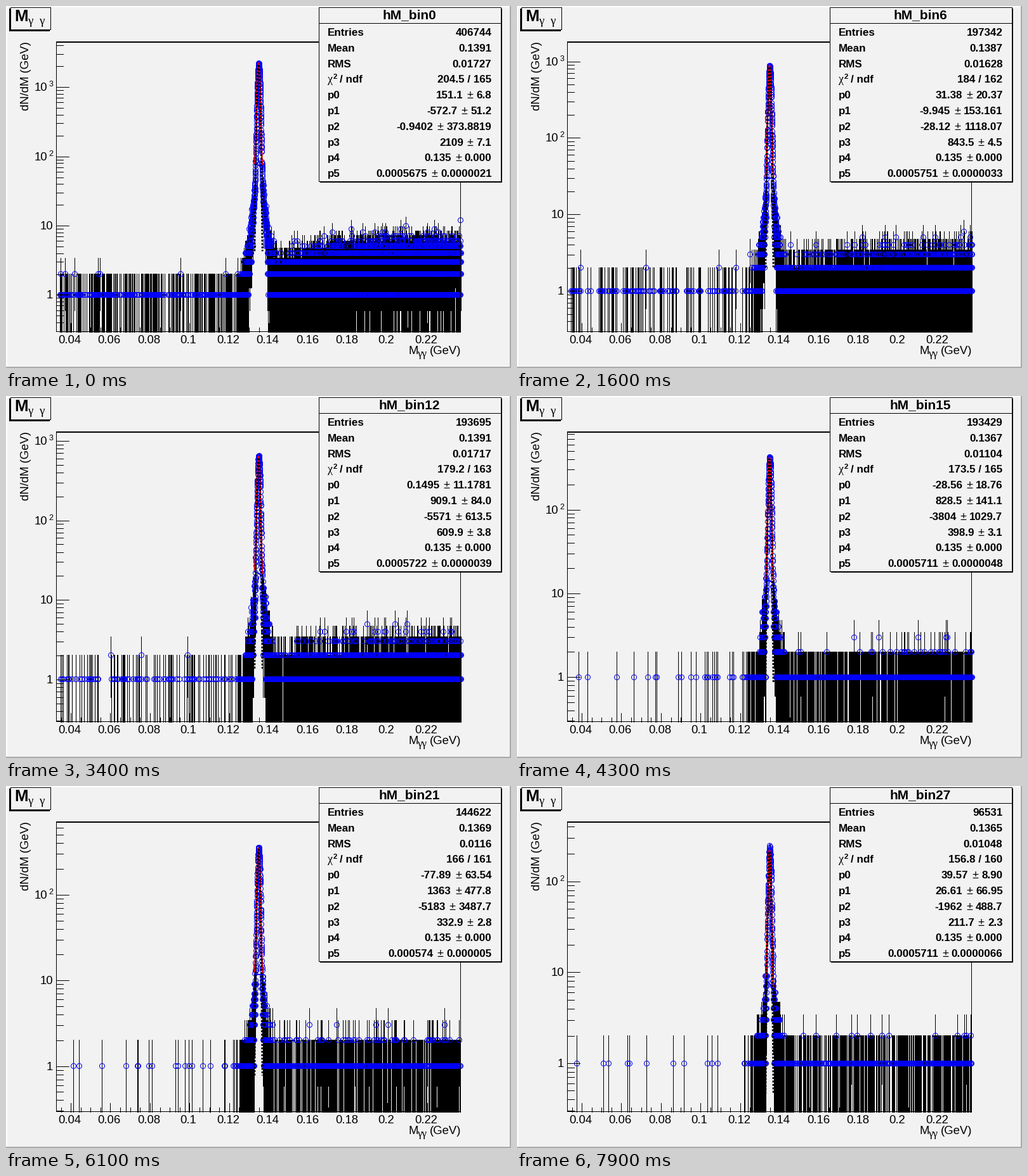
These frames come from a looping animation (796x572 px, 8000 ms). A matplotlib script:

```python
import numpy as np
import matplotlib.pyplot as plt
from matplotlib.animation import FuncAnimation
from matplotlib.collections import LineCollection
from matplotlib.patches import Rectangle

W, H, DPI = 796, 572, 100
PT = 72 / DPI
LEFT, RIGHT, TOP, BOTTOM = 79.5, 716.5, 57, 514.5
PX_PER_GEV, PEAK_X, MASS = 3120, 398, .135
LOG_MIN = -0.535
SANS, SERIF = "Liberation Sans", "Liberation Serif"
PAPER = "#f2f2f2"

# Key points over the bins; all other quantities follow from these
KEY_BINS = [0, 6, 12, 17, 21, 24, 27]
TRACKS = {
    "entries": [406744, 197342, 193695, 193252, 144622, 140587, 96531],
    "rms": [.01727, .01628, .01717, .006953, .0116, .01643, .01048],
    "height": [2109, 843.5, 609.9, 258.2, 332.9, 622.9, 211.7],
    "slope": [-572.7, -9.945, 909.1, 774.8, 1363, 465.2, 26.61],
    "curvature": [-.9402, -28.12, -5571, -2626, -5183, -608.7, -1962],
}


def gev_to_px(m):
    return PEAK_X + (m - MASS) * PX_PER_GEV


def fit_for(b):
    """Values and errors of p0..p5, with the summary rows above them."""
    rng = np.random.default_rng(b)
    entries, rms, height, slope, curvature = (
        np.interp(b, KEY_BINS, track) for track in TRACKS.values())
    ndf = rng.integers(160, 166)
    chi2 = ndf * (.98 + .26 * np.log10(height / 212))
    p0 = .035 * height - slope * MASS - curvature * MASS ** 2
    sigma = .000568 + rng.normal(0, 4e-6)
    values = [p0, slope, curvature, height, MASS, sigma]
    slope_error = 10 ** rng.uniform(1.65, 3.1)
    root = np.sqrt(height)
    errors = [.133 * slope_error, slope_error, 7.3 * slope_error,
              .155 * root, 1e-5, 96e-6 / root]
    summary = [f"{entries:.0f}", f"{MASS + 13.9 * rms ** 2:.4g}", f"{rms:.4g}",
               f"{chi2:.4g} / {ndf}"]
    return summary, values, errors, rms


def counts_for(b, height, sigma, rms):
    """Poisson counts: a peak with tails, a low left side and a rising right side."""
    rng = np.random.default_rng(100 + b)
    x = np.linspace(84, 716.4, 8420)
    d = np.abs(x - PEAK_X)
    far = 4.8 * height * rms ** 2
    near = .25 * far + .04
    rise = 1 - np.exp(-np.clip(x - 425, 0, None) / 110)
    mean = np.where(x < PEAK_X, .025 * far, near + (far - near) * rise)
    mean += .95 * height * np.exp(-.5 * (d / (sigma * PX_PER_GEV)) ** 2)
    mean += .065 * height * np.exp(-d / 4.2) + .7 * np.exp(-d / 11)
    n = rng.poisson(mean)
    points = np.unique(np.column_stack([np.floor(x), n])[n > 0], axis=0)
    return points[:, 0] + .5, points[:, 1]


fig = plt.figure(figsize=(W / DPI, H / DPI), dpi=DPI, facecolor=PAPER)
ax = fig.add_axes([0, 0, 1, 1])
ax.set(xlim=(0, W), ylim=(H, 0))
ax.axis("off")


def fill(x0, y0, x1, y1, color="black", z=5):
    ax.add_patch(Rectangle((x0, y0), x1 - x0, y1 - y0, fc=color, ec="none",
                           aa=False, zorder=z))


def panel(x0, y0, x1, y1):
    fill(x0, y0, x1, y1, z=7)
    fill(x0 + 1, y0 + 1, x1 - 1, y1 - 1, PAPER, 7.5)


def label(x, y, s="", size=18.5, ha="left", bold=False, font=SANS):
    return ax.text(x, y, s, fontsize=size * PT, ha=ha, va="baseline", family=font,
                   weight="bold" if bold else "normal", zorder=8)


def segments(z):
    lines = LineCollection([], colors="black", linewidths=PT, antialiaseds=False, zorder=z)
    return ax.add_collection(lines, autolim=False)


def curve(color, width, style="-"):
    return ax.plot([], [], color=color, lw=width * PT, ls=style, zorder=4,
                   dash_capstyle="butt")[0]


# Bevelled canvas edge
fill(0, 0, W, 2, "white")
fill(0, 0, 2, H, "white")
fill(W - 2, 0, W, H, "#aaaaaa")
fill(0, H - 2, W, H, "#aaaaaa")

# Plot frame and x axis
fill(79, 56, 717, 58)
fill(79, 514, 717, 515)
fill(79, 56, 80, 515)
fill(716, 56, 717, 515)
x_ticks = []
for k in range(7, 48):
    px = np.floor(gev_to_px(k * .005)) + .5
    if LEFT < px < RIGHT:
        major = k % 4 == 0
        x_ticks.append([(px, BOTTOM), (px, BOTTOM - (14 if major else 7))])
        if major:
            label(px - 1, 533, f"{k * .005:.2g}", ha="center")
segments(5).set_segments(x_ticks)

label(634, 550, "M")
label(648, 554, "γγ", 17, font=SERIF)
label(717, 550, "(GeV)", ha="right")
ax.text(40, 56, "dN/dM (GeV)", fontsize=18.5 * PT, family=SANS, rotation=90,
        ha="right", va="top", zorder=8)

# Title box
fill(5, 4, 69, 40, z=6)
panel(7, 2, 71, 38)
label(13, 24, "M", 26, bold=True)
label(35, 29, "γ", 19, font=SERIF)
label(53, 29, "γ", 19, font=SERIF)

# Statistics box
fill(495, 4, 782, 279, z=6)
panel(493, 2, 781, 278)
fill(493, 27, 781, 28, z=8)
header = label(636, 20.5, size=20.9, ha="center", bold=True)
ROWS = [47 + 24.8 * k for k in range(10)]
names = ["Entries", "Mean", "RMS", ""] + [f"p{k}" for k in range(6)]
for name, y in zip(names, ROWS):
    label(507, y, name, 17, bold=True)
label(507, ROWS[3], "χ", 18, font=SERIF)
label(516, ROWS[3] - 6, "2", 11.5, bold=True)
label(526, ROWS[3], "/ ndf", 17, bold=True)
right_texts = [label(765.5, y, size=17, ha="right", bold=True) for y in ROWS]
left_texts = [label(0, y, size=17, ha="right", bold=True) for y in ROWS[4:]]
signs = [label(0, y, "±", 18, ha="center") for y in ROWS[4:]]

# Parts that change with the bin
bars = segments(2)
y_ticks = segments(5)
markers, = ax.plot([], [], "o", ms=8 * PT, mfc="none", mec="blue", mew=PT,
                   aa=False, zorder=3)
total_fit = curve("red", 2.5)
background_fit = curve("blue", 2)
signal_fit = curve("black", 3, (0, (1, .8)))
decade_labels = [(label(0, 0, ha="right"), label(74, 0, size=12.5, ha="right"))
                 for _ in range(4)]


def text_width(s, size=17):
    return size * sum({".": .278, "-": .333}.get(c, .556) for c in s)


def draw_stats(b, summary, values, errors):
    header.set_text(f"hM_bin{b}")
    for text, s in zip(right_texts, summary):
        text.set_text(s)
    for k, (value, error) in enumerate(zip(values, errors)):
        shown = f"{value:.4g}"
        digits = max(1, len(shown.partition(".")[2]))
        error_text = f"{error:.{digits}f}"
        start = 765.5 - text_width(error_text)
        right_texts[4 + k].set_text(error_text)
        signs[k].set_x(start - 10)
        left_texts[k].set_x(start - 21)
        left_texts[k].set_text(shown)


def draw_y_axis(to_y):
    ticks = []
    for power in range(-1, 4):
        for m in range(1, 10):
            y = np.floor(to_y(m * 10.0 ** power)) + .5
            if TOP < y < BOTTOM:
                ticks.append([(LEFT, y), (LEFT + (19.5 if m == 1 else 10), y)])
    y_ticks.set_segments(ticks)
    for power, (base, exponent) in enumerate(decade_labels):
        y = to_y(10.0 ** power)
        visible = y > TOP
        base.set_text(("1" if power == 0 else "10") if visible else "")
        exponent.set_text(str(power) if visible and power > 1 else "")
        base.set_position((65.5 if power > 1 else 74, y + 6.5))
        exponent.set_y(y - .5)


def update(frame):
    b = (frame + 2) // 3
    summary, values, errors, rms = fit_for(b)
    p0, p1, p2, height, centre, sigma = values
    decade = (BOTTOM - TOP) / (np.log10(2.1 * height) - LOG_MIN)

    def to_y(n):
        return BOTTOM - (np.log10(np.maximum(n, 10 ** LOG_MIN)) - LOG_MIN) * decade

    x, n = counts_for(b, height, sigma, rms)
    low, high = to_y(n - np.sqrt(n)), to_y(n + np.sqrt(n))
    bars.set_segments(np.stack([np.column_stack([x, low]),
                                np.column_stack([x, high])], axis=1))
    markers.set_data(x, to_y(n))

    m = np.linspace(.133, .137, 160)
    signal = height * np.exp(-.5 * ((m - centre) / sigma) ** 2)
    background = p0 + p1 * m + p2 * m * m
    for line, f in ((total_fit, signal + background), (background_fit, background),
                    (signal_fit, signal)):
        line.set_data(gev_to_px(m), to_y(f))

    draw_y_axis(to_y)
    draw_stats(b, summary, values, errors)
    return []


anim = FuncAnimation(fig, update, frames=80, interval=100, repeat=True,
                     repeat_delay=0, blit=False)
plt.show()
```
